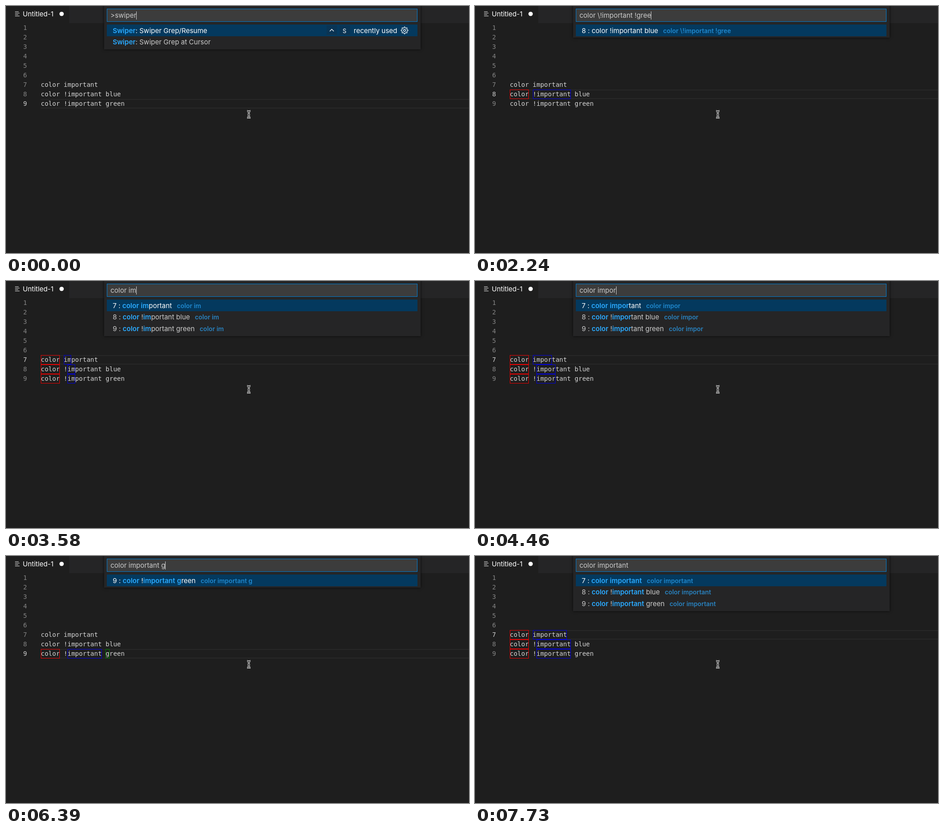
Animation, 1024 px wide and 547 px high, one loop 8000 ms. Source, as an HTML page with a canvas:

```html
<!DOCTYPE html>
<html lang="en">
<head>
<meta charset="utf-8">
<title>Editor search</title>
<style>
html, body { margin: 0; width: 100%; height: 100%; overflow: hidden; background: #1e1e1e; }
canvas { display: block; }
</style>
</head>
<body>
<canvas id="stage" width="1024" height="547"></canvas>
<script>
const ctx = document.getElementById('stage').getContext('2d');
const LOOP = 8000;
const UI = '15px Inter, sans-serif';
const UI_BOLD = '600 15px Inter, sans-serif';
const HINT = '600 13.8px Inter, sans-serif';
const MONO = '14px "DejaVu Sans Mono", monospace';
const CHAR = 8.43, TEXT_X = 77, LINE_H = 21, ROW_H = 26;
const BLUE = '#2aaaff', GREY = '#cccccc';
const MARKS = ['#f00000', '#0000e6', '#008000'];

const LINES = ['', '', '', '', '', '', 'color important', 'color !important blue', 'color !important green'];
const HISTORY = 'color \\!important !green';

// [start ms, typed text, options]; `editor` is the query the editor still shows
const STEPS = [
  [0, '>swiper'],
  [150, '>swiper', { caret: false }],
  [600, HISTORY, { selected: true, editor: '' }],
  [740, HISTORY, { selected: true }],
  [2240, HISTORY.slice(0, -1)],
  [2680, 'c'],
  [2830, 'co'],
  [2980, 'col'],
  [3130, 'colo'],
  [3280, 'color'],
  [3430, 'color i'],
  [3580, 'color im'],
  [3720, 'color imp'],
  [3870, 'color impo'],
  [4320, 'color impor', { editor: 'color impo' }],
  [4460, 'color impor'],
  [4760, 'color import'],
  [4910, 'color importan'],
  [5060, 'color important'],
  [5500, 'color important '],
  [6100, 'color important ', { caret: false }],
  [6390, 'color important g'],
  [6680, 'color important '],
  [6830, 'color important b'],
  [6980, 'color important bl'],
  [7130, 'color important blue'],
  [7580, 'color important b'],
  [7730, 'color important', { caret: false }],
];

function rect(x, y, w, h, color) {
  ctx.fillStyle = color;
  ctx.fillRect(x, y, w, h);
}

function outline(x, y, w, h, color) {
  ctx.strokeStyle = color;
  ctx.lineWidth = 1;
  ctx.strokeRect(x + 0.5, y + 0.5, w - 1, h - 1);
}

// Draws text and returns the x where it ends.
function write(text, x, y, font, color) {
  ctx.font = font;
  ctx.fillStyle = color;
  ctx.fillText(text, x, y);
  return x + ctx.measureText(text).width;
}

// Ranges of every wanted word in order, or null when the line does not match.
function match(line, query) {
  const ranges = [];
  let from = 0;
  for (const word of query.split(' ').filter(Boolean)) {
    if (word[0] === '!') {
      if (line.includes(word.slice(1))) return null;
      continue;
    }
    const wanted = word.replace('\\', '');
    const start = line.indexOf(wanted, from);
    if (start < 0) return null;
    from = start + wanted.length;
    ranges.push([start, from]);
  }
  return ranges;
}

function search(query) {
  return LINES.flatMap((text, index) => {
    const ranges = text && query ? match(text, query) : null;
    return ranges ? [{ text, index, ranges }] : [];
  });
}

function drawEditor(query) {
  const hits = search(query);
  const active = hits.length ? hits[0].index : 8;
  const lineTop = index => 38 + index * LINE_H;

  rect(TEXT_X, lineTop(active), 947, 2, '#282828');
  rect(TEXT_X, lineTop(active) + 19, 947, 2, '#282828');
  LINES.forEach((text, i) => {
    const y = lineTop(i) + 15;
    write(String(i + 1), 38, y, MONO, i === active ? '#d0d0d0' : '#858585');
    write(text, TEXT_X, y, MONO, '#d4d4d4');
  });
  for (const { index, ranges } of hits) {
    ranges.forEach(([a, b], i) => {
      const x = Math.round(TEXT_X + a * CHAR);
      outline(x, lineTop(index), Math.round(TEXT_X + b * CHAR) - x, LINE_H, MARKS[i]);
    });
  }
}

function drawTabs() {
  rect(0, 0, 1024, 547, '#1e1e1e');
  rect(140, 0, 884, 38, '#252526');
  [[20, 8], [20, 10], [20, 7], [20, 10]].forEach(([x, w], i) => rect(x, 12 + i * 3.2, w, 1.2, '#c5c5c5'));
  write('Untitled-1', 37, 23, UI, '#ffffff');
  ctx.beginPath();
  ctx.arc(123, 17.5, 4.8, 0, 2 * Math.PI);
  ctx.fill();
}

function drawGear(x, y) {
  ctx.strokeStyle = '#ffffff';
  ctx.lineWidth = 1.2;
  ctx.beginPath();
  for (let i = 0; i <= 32; i++) {
    const angle = (i - 0.5) * Math.PI / 16;
    const radius = i % 4 < 2 ? 7.6 : 5.6;
    ctx.lineTo(x + radius * Math.cos(angle), y + radius * Math.sin(angle));
  }
  ctx.closePath();
  ctx.moveTo(x + 2.4, y);
  ctx.arc(x, y, 2.4, 0, 2 * Math.PI);
  ctx.stroke();
}

function drawKey(x) {
  rect(x, 43, 23, 20, 'rgba(20, 40, 60, 0.3)');
  rect(x, 62, 23, 1, '#1b2f40');
}

function drawCommands() {
  ['Swiper Grep/Resume', 'Swiper Grep at Cursor'].forEach((name, i) => {
    const y = 59.5 + i * (ROW_H - 0.5);
    const end = write('Swiper', 236, y, UI_BOLD, BLUE);
    write(': ' + name, end, y, UI, i ? GREY : '#ffffff');
  });
  drawKey(709);
  drawKey(738);
  ctx.strokeStyle = '#ffffff';
  ctx.lineWidth = 1.3;
  ctx.beginPath();
  ctx.moveTo(716, 56);
  ctx.lineTo(720.5, 51.5);
  ctx.lineTo(725, 56);
  ctx.stroke();
  write('S', 744.5, 59.5, '13px Inter, sans-serif', '#ffffff');
  write('recently used', 769, 59.5, UI, '#ffffff');
  drawGear(881.5, 54);
}

function drawHits(hits, query) {
  hits.forEach(({ text, index, ranges }, row) => {
    const y = 59.5 + row * (ROW_H - 0.2);
    const color = row ? GREY : '#ffffff';
    let x = write(`${index + 1} : `, 236, y, UI, color);
    let from = 0;
    for (const [a, b] of query.includes('\\') ? [] : ranges) {
      x = write(text.slice(from, a), x, y, UI, color);
      x = write(text.slice(a, b), x, y, UI_BOLD, BLUE);
      from = b;
    }
    x = write(text.slice(from), x, y, UI, color);
    write(query.trim(), x + 11, y, HINT, row ? '#2982bf' : '#1f88ce');
  });
}

function drawPalette(query, { caret = true, selected = false }) {
  const isCommand = query[0] === '>';
  const hits = isCommand ? [] : search(query);
  const rows = isCommand ? 2 : hits.length;

  ctx.save();
  ctx.shadowColor = 'rgba(0, 0, 0, 0.7)';
  ctx.shadowBlur = 6;
  rect(217, -10, 700, 54 + rows * ROW_H, '#252526');
  ctx.restore();

  rect(223, 6, 687, 29, '#3c3c3c');
  outline(223, 6, 687, 29, '#007fd4');
  ctx.font = UI;
  if (selected) rect(231, 12, ctx.measureText(query).width, 18, '#5f7ba8');
  const end = write(query, 231, 26, UI, GREY);
  if (caret && !selected) rect(Math.round(end), 12, 1, 18, '#d4d4d4');

  rect(223, 41, 687, ROW_H, '#04395e');
  if (isCommand) drawCommands();
  else drawHits(hits, query);
}

function drawPointer() {
  for (const [color, width] of [['#ffffff', 3.4], ['#1e1e1e', 1.3]]) {
    ctx.strokeStyle = color;
    ctx.lineWidth = width;
    ctx.stroke(new Path2D('M533 232.5Q537 232.5 537 235V245Q537 247.5 533 247.5M541 232.5Q537 232.5 537 235M537 245Q537 247.5 541 247.5M534.5 241H539.5'));
  }
}

function frame(now) {
  const time = now % LOOP;
  const [, query, options = {}] = STEPS.findLast(([start]) => start <= time);
  const editorQuery = options.editor ?? (query[0] === '>' ? '' : query);
  drawTabs();
  drawEditor(editorQuery);
  drawPalette(query, options);
  drawPointer();
  requestAnimationFrame(frame);
}
frame(0);
</script>
</body>
</html>
```
